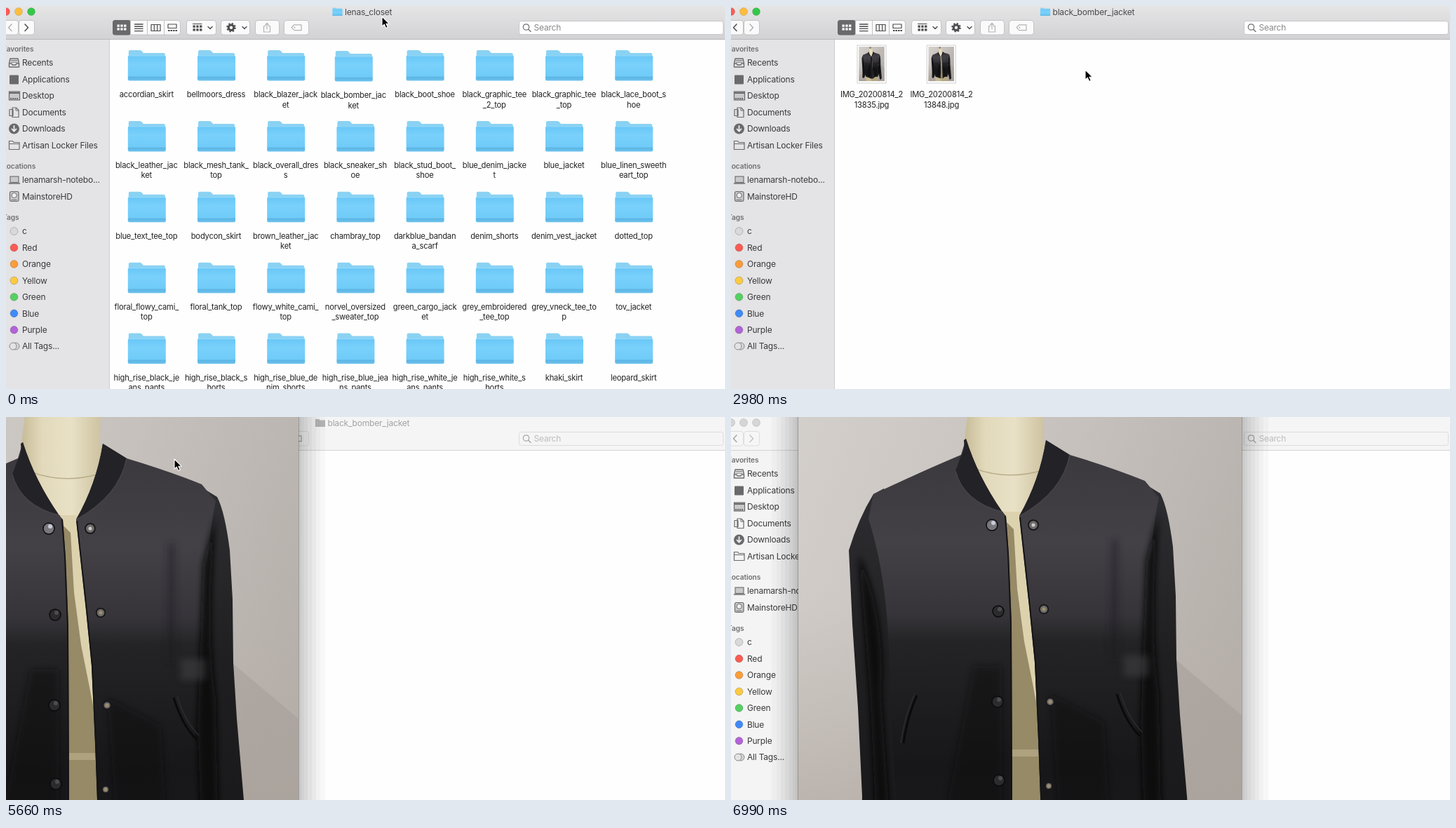
An HTML page that plays this animation: 1025x546 px, repeating every 8 s.

```html
<!DOCTYPE html>
<html lang="en">
<head>
<meta charset="utf-8">
<title>File browser</title>
<style>
  html, body { margin: 0; width: 100%; height: 100%; overflow: hidden; background: #fff; }
  svg { display: block; width: 100vw; height: 100vh; }
  text { font: 12px Inter, "Open Sans", sans-serif; letter-spacing: -.2px; fill: #3a3a3c; }
  .lab { font-size: 11.2px; text-anchor: middle; fill: #222; }
  .head { font-size: 10.2px; font-weight: 600; fill: #707072; letter-spacing: -.1px; }
</style>
</head>
<body>
<svg viewBox="0 0 1025 546" preserveAspectRatio="none">
  <defs>
    <linearGradient id="bar" x2="0" y2="1"><stop stop-color="#e6e5e6"/><stop offset="1" stop-color="#d2d1d3"/></linearGradient>
    <linearGradient id="front" x2="0" y2="1"><stop stop-color="#68c6f6"/><stop offset=".35" stop-color="#79d1fb"/><stop offset=".82" stop-color="#70cbf8"/><stop offset=".86" stop-color="#5db5e4"/><stop offset="1" stop-color="#6cc3ee"/></linearGradient>
    <linearGradient id="wall" x2="1" y2=".5"><stop stop-color="#d4d0cc"/><stop offset=".55" stop-color="#c6c1bd"/><stop offset="1" stop-color="#b6b0ab"/></linearGradient>
    <linearGradient id="shade" x2="0" y2="1"><stop stop-color="#bcb3ab" stop-opacity="0"/><stop offset="1" stop-color="#a89f97"/></linearGradient>
    <linearGradient id="cloth" gradientUnits="userSpaceOnUse" x1="0" y1="40" x2="0" y2="700"><stop stop-color="#3a383d"/><stop offset=".22" stop-color="#434146"/><stop offset=".375" stop-color="#363439"/><stop offset=".43" stop-color="#242426"/><stop offset=".7" stop-color="#171719"/><stop offset="1" stop-color="#1b1b1e"/></linearGradient>
    <linearGradient id="arm" gradientUnits="userSpaceOnUse" x1="0" y1="110" x2="0" y2="700"><stop stop-color="#2e2d31"/><stop offset=".4" stop-color="#1f1f21"/><stop offset="1" stop-color="#161618"/></linearGradient>
    <linearGradient id="neck"><stop stop-color="#c6bb97"/><stop offset=".25" stop-color="#e2d9bb"/><stop offset=".6" stop-color="#e9e1c6"/><stop offset="1" stop-color="#cabf9c"/></linearGradient>
    <filter id="soft" x="-50%" y="-20%" width="200%" height="140%"><feGaussianBlur stdDeviation="5"/></filter>

    <g id="folder">
      <path d="M-26 5V2q0-2 2-2h14q2 0 3 1.500l2 2.500h29q2 0 2 2v6h-52z" fill="#8ad2f3"/>
      <rect x="-27" y="7.500" width="54" height="36" rx="2" fill="url(#front)"/>
      <path d="M-26 8h52" stroke="#9adcfa" stroke-width="1"/>
    </g>

    <g id="photo">
      <rect x="18" y="-86" width="632" height="850" fill="url(#wall)"/>
      <rect x="18" y="250" width="632" height="514" fill="url(#shade)"/>
      <g fill="#a39b95" opacity=".45">
        <path d="M550 346L650 430V764H500z"/>
        <path d="M550 364L650 462V764H500z"/>
      </g>
      <path d="M284 -86h34v48h-34z" fill="#77736f"/>
      <circle cx="301" cy="-65" r="21" fill="#8b8885"/>
      <circle cx="295" cy="-72" r="8" fill="#c8c6c4"/>
      <path d="M262 -20L368 -20 367 40 374 45 345 152H304L254 45z" fill="url(#neck)"/>
      <path d="M247 -22q0-18 57-18t61 18q-55 14-118 0z" fill="#d8cfb2"/>
      <path d="M268 78q48 18 98 3" fill="none" stroke="#b9ae8b" stroke-width="1.500"/>
      <path d="M185 635H478L470 764H196z" fill="#c5b993"/>
      <path d="M330 640H478L470 764H330z" fill="#b3a780"/>
      <path d="M306 140H340L362 355 376 700H310z" fill="#ddd2ae"/>
      <path d="M310 150L325 165 330 250 340 325 353 390 370 480 376 700H310z" fill="#968a67"/>
      <path d="M318 479h48v10h-48z" fill="#aea27f"/>
      <text x="327" y="697" style="font-size:34px;text-anchor:middle;fill:#56503d">6</text>
      <g id="coat">
        <path d="M140 107L125 115Q104 149 90 195L95 300 103 420 109 546 106 655 118 690 153 678 168 638 190 560 205 250z" fill="url(#arm)"/>
        <path d="M500 93L534 114Q545 135 552 190L556 260 557 350 562 430 572 546 583 690 563 722 539 716 524 650 480 520 470 200z" fill="url(#arm)"/>
        <path d="M250 59Q195 82 125 115L118 150Q150 250 148 400L158 560 185 635 203 658 316 698 323 546 322 300 318 200 314 146 308 139Q274 90 257 36z" fill="url(#cloth)"/>
        <path d="M405 59Q465 77 512 96L532 120Q510 220 524 400L515 560 488 655 411 662 372 702 363 546 360 465 355 355 347 275 333 146Q362 95 371 38z" fill="url(#cloth)"/>
        <g fill="#08080a" filter="url(#soft)">
          <path d="M104 200Q143 290 136 400L150 600 128 570 120 400z"/>
          <path d="M532 140Q518 300 532 400L536 600 510 560 506 440 514 210z"/>
        </g>
        <g filter="url(#soft)" opacity=".45">
          <path d="M268 360l40 0 0 300-90-40z" fill="#0b0b0c"/>
          <path d="M378 400l76 40 10 190-70 10z" fill="#0b0b0c"/>
          <path d="M464 180l10 0 0 170-12 0z" fill="#1d1d20"/>
          <path d="M482 345h36v30h-36z" fill="#4a484d"/>
        </g>
        <path d="M257 36Q274 90 308 139Q253 126 242 82L250 60Q256 52 254 38z" fill="#232226"/>
        <path d="M371 38L405 59Q395 112 333 146Q362 95 371 38z" fill="#232226"/>
        <path d="M242 82Q253 126 310 141M405 59Q395 112 334 146" fill="none" stroke="#454348" stroke-width="1.500"/>
        <path d="M187 402Q174 430 168 470M472 400Q484 440 505 460" fill="none" stroke="#0a0a0b" stroke-width="3"/>
        <path d="M183 402Q170 430 164 470M477 398Q488 434 508 454" fill="none" stroke="#2c2b2e" stroke-width="1.500"/>
        <path d="M105 655l15 33 34-11M527 655l13 60 23 6" fill="none" stroke="#0c0c0d" stroke-width="3"/>
        <path d="M313 146L317 200 321 300 322 546 315 690M334 148L348 275 356 355 361 465 364 546 371 695" fill="none" stroke="#151516" stroke-width="2"/>
        <g id="snaps"></g>
      </g>
    </g>

    <g id="preview">
      <g id="glow"></g>
      <path d="M18 -80v-18q0-8 8-8h616q8 0 8 8v18z" fill="#dedddd"/>
      <circle cx="30" cy="-96" r="5" fill="#ee6a5f"/><circle cx="48" cy="-96" r="5" fill="#f5bd4f"/><circle cx="66" cy="-96" r="5" fill="#61c554"/>
      <path d="M90 -94h90M270 -98h190M520 -94h110" stroke="#bdbdbd" stroke-width="5" stroke-dasharray="16 7"/>
      <use href="#photo"/>
      <rect x="17.500" y="-106" width="633" height="870" rx="5" fill="none" stroke="#000" stroke-opacity=".22"/>
    </g>
  </defs>

  <rect width="1025" height="546" fill="#fefefe"/>
  <g id="files"></g>
  <g id="chrome"></g>
  <use id="win" href="#preview"/>
  <path id="arrow" d="M0 0V14.200L3.300 11.200 5.600 16.400 8.200 15.300 5.900 10.200H10.200z" fill="#000" stroke="#fff" stroke-width="1.100" stroke-linejoin="round"/>
</svg>

<script>
const $ = id => document.getElementById(id);
const rect = (x, y, w, h, fill, extra = '') =>
  `<rect x="${x}" y="${y}" width="${w}" height="${h}" fill="${fill}" ${extra}/>`;
const dot = (x, y, r, fill, extra = '') => `<circle cx="${x}" cy="${y}" r="${r}" fill="${fill}" ${extra}/>`;
const text = (x, y, s, extra = '') => `<text x="${x}" y="${y}" ${extra}>${s}</text>`;
const line = (d, c, w = 1.2) =>
  `<path d="${d}" fill="none" stroke="${c}" stroke-width="${w}" stroke-linecap="round" stroke-linejoin="round"/>`;
const at = (x, y, s) => `<g transform="translate(${x} ${y})">${s}</g>`;

const folders = `accordian_skirt bellmoors_dress black_blazer_jack|et black_bomber_jac|ket
black_boot_shoe black_graphic_tee|_2_top black_graphic_tee|_top black_lace_boot_s|hoe
black_leather_jac|ket black_mesh_tank_|top black_overall_dres|s black_sneaker_sh|oe
black_stud_boot_|shoe blue_denim_jacke|t blue_jacket blue_linen_sweeth|eart_top
blue_text_tee_top bodycon_skirt brown_leather_jac|ket chambray_top
darkblue_bandan|a_scarf denim_shorts denim_vest_jacket dotted_top
floral_flowy_cami_|top floral_tank_top flowy_white_cami_|top norvel_oversized|_sweater_top
green_cargo_jack|et grey_embroidered|_tee_top grey_vneck_tee_to|p tov_jacket
high_rise_black_je|ans_pants high_rise_black_s|horts high_rise_blue_de|nim_shorts high_rise_blue_jea|ns_pants
high_rise_white_je|ans_pants high_rise_white_s|horts khaki_skirt leopard_skirt`.split(/\s+/);

// Two-line name under an icon; pick is '', 'on' or 'off'
function label(x, y, name, pick = '') {
  return name.split('|').map((s, i) => {
    const w = s.length * 5.55 + 6, top = y - 12 + i * 14.5;
    const pill = pick ? rect(x - w / 2, top, w, 15.5, pick == 'on' ? '#0b61de' : '#dcdcdc', 'rx="3"') : '';
    return pill + text(x, y + i * 14.5, s, `class="lab"${pick == 'on' ? ' style="fill:#fff"' : ''}`);
  }).join('');
}
const halo = (x, y) => rect(x - 32, y, 64, 64, '#dcdcdc', 'rx="4"');

function closet(picked) {
  return folders.map((name, i) => {
    const moved = i == 3;
    const x = 200.8 + (i % 8) * 99.2 - (moved ? 2.6 : 0);
    const y = 63 + (i >> 3) * 100.9 + (moved ? 1 : 0);
    const sel = moved && picked;
    return (sel ? halo(x, y - 11) : '') + `<use href="#folder" x="${x}" y="${y}"/>` +
      label(x - .5, y + 67, name, sel ? 'on' : '');
  }).join('');
}

function thumbs(pick, loaded) {
  const pic = (x, shut) => rect(x - 20.5, 56, 41, 54, '#fff', 'stroke="#c4c4c4" stroke-width=".8"') +
    (loaded ? `<g transform="translate(${x - 19.3} 63) scale(.0577)"><use href="#photo"/>` +
      (shut ? '<path d="M308 150H340L372 700H308z" fill="#1c1c1f"/>' : '') + '</g>' : '');
  return pic(200.5, true) + label(200.5, 130, 'IMG_20200814_2|13835.jpg') +
    (pick ? halo(300, 52) : '') + pic(299.7) + label(300, 130, 'IMG_20200814_2|13848.jpg', pick);
}

const tags = [['c', '#d9d9da'], ['Red', '#fc5b52'], ['Orange', '#fd9d3a'], ['Yellow', '#fdcb41'],
  ['Green', '#54d163'], ['Blue', '#3f8afa'], ['Purple', '#b263d8']];

function sidebar(active) {
  const c = '#6a6a6c', g = '#c9c9ca';
  const icons = {
    Recents: line('M6 -6H17L18.500 1V6H4.500V1zM5 1H8L9 3H14L15 1H18', c, 1.4) + line('M7 -3.500H16M7 -1H16', c, 1),
    Applications: rect(5, -6, 13, 13, c, 'rx="1"'),
    Desktop: rect(4.500, -6, 15, 12, g, `stroke="${c}" stroke-width="1.200"`) + line('M5 -4H19', c, 2) +
      '<path d="M6 4H18" stroke="#6a6a6c" stroke-width="2" stroke-dasharray="2 1"/>',
    Documents: line('M5 -4H10V5H5zM9 -6.500H14.500L18 -3V7H9z', c) + line('M14 -6V-2.500H18', c, 1),
    Downloads: dot(11.5, 0, 7.5, c) + line('M11.500 -4V3M8.500 .5L11.500 3.700L14.500 .5', '#f0f0f0', 1.8),
    'Artisan Locker Files': line('M4.500 6V-6H9.500L11 -4H19V6zM4.500 -2H19', c),
    'lenamarsh-notebo...': rect(6, -5, 12, 8.5, g, `stroke="${c}" stroke-width="1.100"`) + line('M4.500 5H19.500', c, 1.6),
    MainstoreHD: rect(5.5, -7, 12.5, 14, g, `rx="2" stroke="${c}" stroke-width="1.200"`) +
      dot(11.7, -1.5, 3.6, '#eee', `stroke="${c}"`) + line('M8 5H15', c, 1.2)
  };
  const ys = [81, 104.5, 128, 151.5, 175, 198.5, 248, 271.5];
  return rect(0, 47, 147, 499, active ? '#e4e3e5' : '#f4f4f4') + rect(147, 47, 1, 499, active ? '#cecdcf' : '#dcdcdc') +
    [['Favorites', 65], ['Locations', 232], ['Tags', 304.5]].map(([s, y]) => text(-5, y, s, 'class="head"')).join('') +
    Object.keys(icons).map((k, i) => at(0, ys[i], icons[k]) + text(23, ys[i] + 4.4, k)).join('') +
    tags.map(([s, f], i) => dot(11.5, 321 + i * 23.45, 5.4, f, 'stroke="#000" stroke-opacity=".2"') +
      text(23, 325.4 + i * 23.45, s)).join('') +
    dot(14, 485, 5, '#d5d5d6', 'stroke="#8b8b8d"') + dot(10, 485, 5, '#e3e3e4', 'stroke="#8b8b8d"') +
    text(23, 489.4, 'All Tags...');
}

function toolbar(active, inside, picked) {
  const ink = active ? '#4c4c4e' : '#a5a5a6', pale = active ? '#b3b3b5' : '#c4c4c4';
  const edge = active ? '#c3c2c4' : '#dedede', face = active ? '#fafafa' : '#f6f6f6';
  const box = (x, w) => rect(x + .5, 20.5, w - 1, 20.5, face, `rx="3.500" stroke="${edge}"`);
  const lights = active ? ['#fc5b57', '#fdbd3e', '#34c84a'] : ['#d6d6d6', '#d6d6d6', '#d6d6d6'];
  const grid = (c, x, y, n, s) => [...Array(n * 2)].map((_, i) =>
    rect(x + (i % n) * s, y + (i / n | 0) * s, s - 1.5, s - 1.5, c)).join('');
  const chev = x => line(`M${x - 3} 29.500L${x} 32.500L${x + 3} 29.500`, ink, 1.4);
  const on = picked ? ink : pale;
  const gear = dot(321, 30.7, 3.7, 'none', `stroke="${ink}" stroke-width="3"`) +
    dot(321, 30.7, 5.8, 'none', `stroke="${ink}" stroke-width="2" stroke-dasharray="2.300 2.255"`);
  const tx = inside ? 441 : 465.5;
  const icon = active
    ? `<g transform="translate(${tx + 7} 2.500) scale(.265)"><use href="#folder"/></g>`
    : `<path d="M${tx} 3h5l1.500 1.500h7.500v9.500h-14z" fill="#b4b4b4"/>`;
  return rect(0, 0, 1025, 47, active ? 'url(#bar)' : '#f5f5f5') + rect(0, 47, 1025, 1, active ? '#b9b8ba' : '#d4d4d4') +
    lights.map((f, i) => dot(i * 18, 8, 5.5, f, 'stroke="#000" stroke-opacity=".12"')).join('') +
    icon + text(tx + 17.5, 12.8, inside ? 'black_bomber_jacket' : 'lenas_closet', `style="fill:${active ? '#48484a' : '#a2a2a3'}"`) +
    box(-8, 26) + box(18, 23) +
    line('M8 26L3.500 30.700L8 35.500', inside ? ink : pale, 1.5) + line('M27 26L31.500 30.700L27 35.500', inside ? pale : ink, 1.5) +
    box(152, 97) + (active ? rect(152, 20, 25.5, 21.5, '#69686a', 'rx="3.500"') : '') +
    grid(active ? '#fff' : ink, 158.5, 26.5, 3, 4.8) +
    line('M183.500 26H195M183.500 29.200H195M183.500 32.400H195M183.500 35.600H195', ink, 1.4) +
    line('M207 26.500H220V35.500H207zM211.300 26.500V35.500M215.700 26.500V35.500', ink) +
    line('M231 26H243V31.500H231z', ink) + `<path d="M231 35h13" stroke="${ink}" stroke-width="2" stroke-dasharray="2.500 1"/>` +
    line('M177.500 21V41M201.500 21V41M225.500 21V41', edge, 1) +
    box(257, 43) + grid(ink, 266.5, 27.5, 3, 4.8) + line('M266.500 25.500H279', ink, 1) + chev(291) +
    box(306, 42) + gear + chev(340) +
    box(355, 35) + line('M369.500 28.500H367.500V37H376.500V28.500H374.500M372 33V24.500M369.500 27L372 24.500L374.500 27', on) +
    box(396, 36) + line('M407 30.700L411 26.800H421V34.700H411z', on) + dot(411.5, 30.7, 1, on) +
    rect(731.5, 21.5, 291, 19, active ? '#fff' : '#f5f5f5', `rx="3" stroke="${active ? '#c6c5c7' : '#dcdcdc'}"`) +
    dot(741.5, 30, 4.2, 'none', `stroke="${active ? '#6d6d6f' : '#a5a5a6'}" stroke-width="1.200"`) +
    line('M744.700 33.200L748 36.500', active ? '#6d6d6f' : '#a5a5a6', 1.3) +
    text(752.5, 35.2, 'Search', `style="fill:${active ? '#88888a' : '#bcbcbd'}"`);
}

$('snaps').innerHTML = [[294, 159], [303, 282], [302, 411], [304, 523]].map(([x, y], i) =>
  dot(x, y, 8, i ? '#2b2b2d' : '#77777d', 'stroke="#0b0b0c" stroke-width="1.500"') + dot(x + 2, y - 3, 3, i ? '#4d4d50' : '#c9cbd6')).join('') +
  [[353, 159], [368, 279], [377, 411], [375, 531]].map(([x, y], i) =>
    dot(x, y, 7 - i * .7, '#6e6c6b', 'stroke="#19191b" stroke-width="2"') + dot(x, y, 2.5, i ? '#a08f6c' : '#cfccca')).join('');

$('glow').innerHTML = [38, 31, 25, 19, 13, 8, 4].map(d =>
  rect(18 - d, -90 - d, 632 + 2 * d, 874 + 2 * d, '#000', `rx="${d + 8}" opacity="${d > 30 ? .025 : .034}"`)).join('');

// Held steps: time, then x, y
const moves = [[0, 536, 15], [150, 535, 14], [300, 532, 11], [450, 527, 7], [600, 520, 3], [750, 513, 1], [890, 510, 1],
  [1190, 511, 2], [1330, 512, 3], [1630, 519, 11], [1780, 525, 32], [1930, 522, 58], [2080, 512, 80], [2230, 505, 91],
  [3730, 490, 62], [3880, 440, 33], [4030, 375, 24], [4180, 325, 58], [4330, 303, 98],
  [5660, 240, 60], [5810, 190, 14], [5960, 160, -60]];
// Time, left, top and scale of the picture window
const zooms = [[0, 0, 0, 0], [5360, 120, 10, .378], [5510, -90, -55, .78], [5660, -215, -86, 1],
  [6400, -184, -87, 1], [6550, 18, -86, 1], [6700, 58, -89, 1], [6850, 74, -90, 1], [6990, 96, -91, 1]];
const stages = [0, 2680, 2830, 2980, 4470, 4910];
const held = (list, t) => list.filter(s => s[0] <= t).pop();

let shown = -1;
function draw(t) {
  const stage = stages.filter(s => s <= t).length - 1;
  if (stage != shown) {
    shown = stage;
    const active = stage < 5, inside = stage > 1;
    const pick = ['', 'on', 'off'][Math.max(0, stage - 3)];
    $('files').innerHTML = inside ? thumbs(pick, stage > 2) : closet(stage == 1);
    $('chrome').innerHTML = sidebar(active) + toolbar(active, inside, stage == 1 || stage > 3);
  }
  const [, cx, cy] = held(moves, t);
  $('arrow').setAttribute('transform', `translate(${cx} ${cy})`);
  const [, x, y, s] = held(zooms, t);
  $('win').setAttribute('display', s ? 'inline' : 'none');
  $('win').setAttribute('opacity', s && s < .5 ? .94 : 1);
  $('win').setAttribute('transform', `translate(${x - 18 * s} ${y + 86 * s}) scale(${s || 1})`);
}
function tick() {
  draw(performance.now() % 8000);
  requestAnimationFrame(tick);
}
tick();
</script>
</body>
</html>
```
